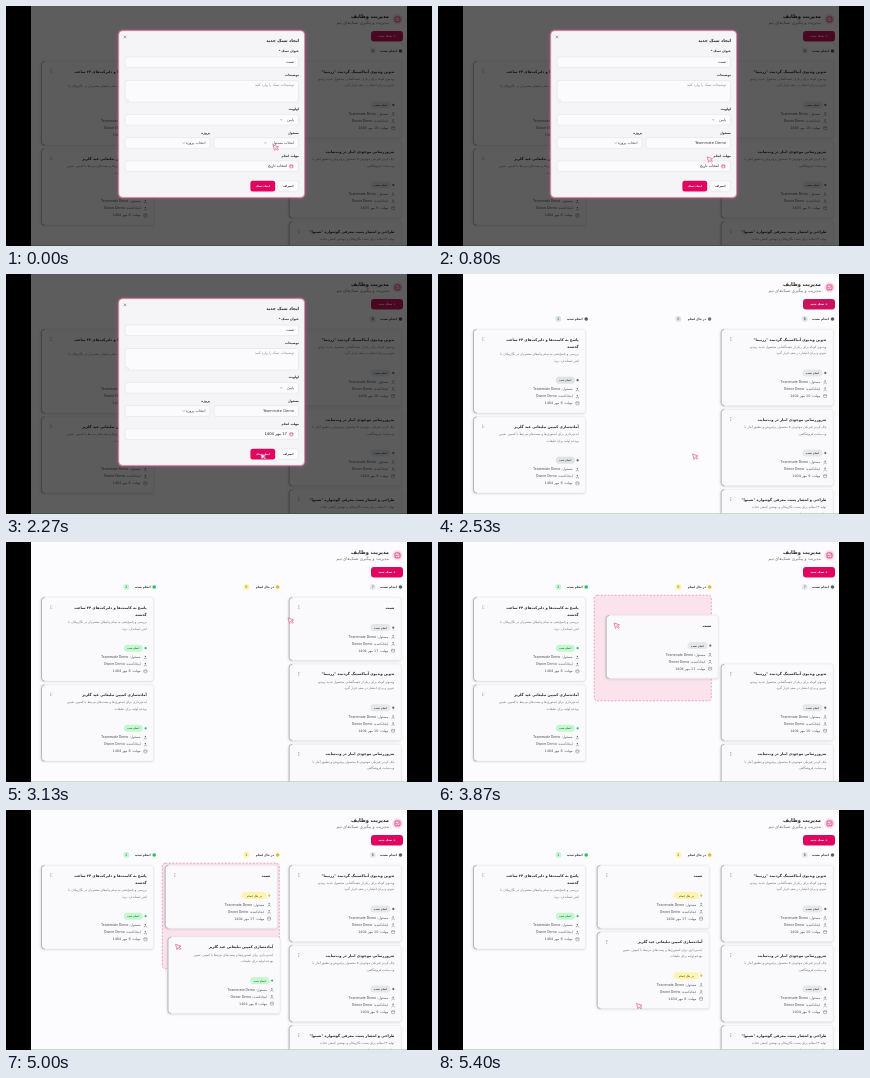
Animation, 426 px wide and 240 px high, one loop 5470 ms. Source, as an HTML page:

```html
<!DOCTYPE html>
<html lang="fa">
<head>
<meta charset="utf-8">
<title>مدیریت وظایف</title>
<style>
html, body { margin: 0; width: 100%; height: 100%; overflow: hidden; background: #000; }
svg { display: block; width: 100vw; height: 100vh; }
text { direction: rtl; font-family: "DejaVu Sans", sans-serif; white-space: pre; }
.latin { font-family: Roboto, sans-serif; }
</style>
</head>
<body>
<svg id="stage" viewBox="0 0 426 240"></svg>
<script>
const LOOP = 5470;
const PINK = '#e0065f', INK = '#222127', SOFT = '#6f6d75';
const STAFF = 'Teammate Demo', OWNER = 'Owner Demo';
const COL = { todo: 283, doing: 159, done: 35.3 };
const TOP = 55.3, GAP = 3.7;

// Key times of the story
const MENU = 220, PICK = 680, CAL = 1150, DAY = 1740, CLOSE = 2470, COLOUR = 2700,
  ADD = 2800, GRAB1 = 3400, DROP1 = 4060, GRAB2 = 4680, DROP2 = 5080;

// Even out the width of the installed Arabic face
const pen = document.createElement('canvas').getContext('2d');
function fit(weight, str, em) {
  pen.font = weight + ' 100px "DejaVu Sans", sans-serif';
  return em * 100 / pen.measureText(str).width;
}
const SCALE = {
  700: fit(700, 'مدیریت وظایف', 38 / 7),
  400: fit(400, 'توضیحات تسک را وارد کنید', 39 / 3.5)
};

const rect = (x, y, w, h, r, fill, more = '') =>
  `<rect x="${x}" y="${y}" width="${w}" height="${h}" rx="${r}" fill="${fill}" ${more}/>`;
const dot = (x, y, r, fill, more = '') => `<circle cx="${x}" cy="${y}" r="${r}" fill="${fill}" ${more}/>`;
const line = (d, colour, w = 0.5) =>
  `<path d="${d}" fill="none" stroke="${colour}" stroke-width="${w}" stroke-linecap="round" stroke-linejoin="round"/>`;
// An underscore in a string stands for a zero-width non-joiner
const text = (x, y, size, str, { w = 400, c = INK, a = 'start', id = '' } = {}) =>
  `<text ${id && `id="${id}"`} x="${x}" y="${y + size * 0.3}" font-size="${size * SCALE[w]}" font-weight="${w}" fill="${c}" text-anchor="${a}">${str.replace(/_/g, '&zwnj;')}</text>`;
const latin = (str, size = 3.6) => `<tspan class="latin" font-size="${size}">${str}</tspan>`;
const group = (id, body) => `<g id="${id}">${body}</g>`;
const calendarIcon = (x, y, c) =>
  rect(x - 1.5, y - 1.4, 3, 3, 0.5, 'none', `stroke="${c}" stroke-width=".45"`) + line(`M${x - 1.5} ${y - 0.4}h3`, c, 0.4);

const STATUS = {
  todo: { label: 'انجام نشده', w: 20, bg: '#e5e7eb', ink: '#33363d', dot: '#5b6069' },
  doing: { label: 'در حال انجام', w: 24.5, bg: '#fdf5ad', ink: '#6b5a12', dot: '#e3bd1c' },
  done: { label: 'انجام شده', w: 19, bg: '#c5f7d1', ink: '#17793a', dot: '#27c25a' },
  grey: { label: 'انجام شده', w: 19, bg: '#dfe3e2', ink: '#3b4340', dot: '#565b5a' },
  hover: { label: 'انجام شده', w: 19, bg: '#e0508c', ink: '#fff', dot: '#27c25a' }
};

const CARDS = {
  unbox: { title: ['تدوین ویدیوی آنباکسینگ گردنبند "زرنیما"'], due: '10',
    note: ['ویدیوی کوتاه برای ریلز از جعبه_گشایی محصول جدید. ویدیو', 'تدوین و برای انتشار در صف قرار گیرد.'] },
  stock: { title: ['به_روزرسانی موجودی انبار در وب_سایت'], due: '9',
    note: ['چک کردن فیزیکی موجودی ۵ محصول پرفروش و تطبیق آمار با', 'وب_سایت فروشگاهی.'] },
  post: { title: ['طراحی و انتشار پست معرفی گوشواره "شبنوا"'], due: '9',
    note: ['تولید ۳ اسلاید برای پست نگارپیکان و نوشتن کپشن جذاب', 'برای معرفی محصول.'] },
  reply: { title: ['پاسخ به کامنت_ها و دایرکت_های ۲۴ ساعت', 'گذشته'], due: '8',
    note: ['بررسی و پاسخ_دهی به تمام پیام_های مشتریان در نگارپیکان با', 'لحن استاندارد برند.'] },
  test: { title: ['تست'], due: '17', note: [] },
  promo: { title: ['آماده_سازی کمپین تبلیغاتی عید گلریز'], due: '8',
    note: ['ایده_پردازی برای استوری_ها و پست_های مرتبط با کمپین. تعیین', 'بودجه اولیه برای تبلیغات.'] }
};

function tag(name, key, y) {
  const s = STATUS[key];
  return group(`${name}-${key}`,
    rect(101.5 - s.w, y - 3.5, s.w, 7, 3.5, s.bg) +
    text(101.5 - s.w / 2, y, 3.3, s.label, { w: 700, c: s.ink, a: 'middle' }) +
    dot(104.3, y, 1.1, s.dot));
}

function card(name) {
  const { title, note, due } = CARDS[name];
  const drop = (title.length - 1) * 7.3;
  const y = (note.length ? 43.6 : 30.3) + drop;
  const h = y + 32.8;
  CARDS[name].h = h;
  const meta = [`مسئول: ${latin(STAFF)}`, `ایجادکننده: ${latin(OWNER)}`, `مهلت: ${due} مهر 1404`];
  let s = rect(-0.7, 0.5, 113, h + 0.5, 3, '#8d8790', 'opacity=".28" filter="url(#soft)"') +
    rect(0, 0, 112.3, h, 3, '#faf9fb', 'stroke="#e6e3e8" stroke-width=".4"') +
    line(`M3 0.2Q0.2 0.2 0.2 3V${h - 3}Q0.2 ${h} 3 ${h}`, '#a39ba3', 0.7);
  for (const d of [-1.4, 0, 1.4]) s += dot(9.5, 9.7 + d, 0.45, '#77747c') + dot(10.7, 9.7 + d, 0.3, '#a9a6ad');
  title.forEach((str, i) => s += text(105.4, 9.8 + i * 7.3, 5, str, { w: 700 }));
  note.forEach((str, i) => s += text(105.4, 17.8 + drop + i * 6.4, 3.2, str, { c: SOFT }));
  for (const key in STATUS) s += tag(name, key, y);
  meta.forEach((str, i) => {
    const my = y + 9 + i * 7;
    s += text(99.3, my, 3.4, str, { c: '#56545c' });
    s += i < 2 ? dot(104.1, my - 0.8, 0.75, '#77747c') + line(`M102.8 ${my + 1.5}q1.3 -2 2.6 0`, '#77747c', 0.6)
      : calendarIcon(104.1, my, '#77747c');
  });
  return group(name, s);
}

function heading(key, right) {
  const s = STATUS[key], w = key === 'doing' ? 30.5 : 27;
  return dot(right, 45, 1.8, s.dot, `id="dot-${key}"`) +
    text(right - 3.7, 45, key === 'doing' ? 4 : 4.2, s.label, { w: 700 }) +
    dot(right - w - 0.8, 45, 3, s.bg, `id="pill-${key}"`) +
    text(right - w - 0.8, 45, 3.4, '', { c: s.ink, a: 'middle', id: `count-${key}` });
}

function board() {
  return rect(25, 0, 376, 240, 0, '#fcfbfd') +
    dot(391.5, 13.2, 5.2, '#fbdce7') +
    rect(389, 10.9, 5, 5, 1, 'none', `stroke="${PINK}" stroke-width=".7"`) +
    line('M390.3 13.4l.9 .9l1.6 -1.8', PINK, 0.6) +
    text(383, 10, 7, 'مدیریت وظایف', { w: 700 }) +
    text(383, 17.2, 4.2, 'مدیریت و پیگیری تسک_های تیم', { c: SOFT }) +
    rect(365, 25, 32, 10.6, 3, PINK, 'id="add"') +
    text(381, 30.2, 3.9, '+ تسک جدید', { w: 700, c: '#fff', a: 'middle' }) +
    heading('todo', 394.5) + heading('doing', 271.6) + heading('done', 148.2) +
    rect(156.3, 53.2, 117, 105.6, 3, '#fbe3ec', 'id="zone" stroke="#ea86ae" stroke-width=".7" stroke-dasharray="2 1.5"') +
    Object.keys(CARDS).map(card).join('') +
    rect(25, 239.2, 376, 0.8, 0, '#b9d6b6');
}

const field = (x, y, w, h) => rect(x, y, w, h, 2, '#fbfafc', 'stroke="#e0dde3" stroke-width=".5"');
const label = (x, y, str) => text(x, y, 4.3, str, { w: 700 });
const select = (x, y, w, str, id, chevron) => field(x, y, w, 10.8) +
  text(x + w - 4.5, y + 5.4, 3.7, str, { c: '#44424a', id }) +
  line(`M${chevron} ${y + 5}l1 .9l1 -.9`, '#77747c', 0.45);

function calendar() {
  const xAt = i => 283.3 - i * 11.7;
  let s = rect(204.3, 53, 88.4, 101.3, 2.5, '#fbfafc', 'stroke="#d98daa" stroke-width=".7"') +
    text(248.3, 60, 4.7, 'مهر 1404', { w: 700, a: 'middle' }) +
    line('M283.6 58.8l1.2 1.3l-1.2 1.3M212.6 58.8l-1.2 1.3l1.2 1.3', '#44424a', 0.55) +
    dot(xAt(5), 98.2, 5.4, '#f8c9db') + dot(xAt(5), 110.2, 5.4, '#f9dbe6', 'id="pick"');
  [...'شیدسچپج'].forEach((ch, i) => s += text(xAt(i), 74, 3.3, ch, { c: '#8c8991', a: 'middle' }));
  for (let n = 0; n < 42; n++) {
    const day = n - 2, inside = day > 0 && day < 31;
    const num = day < 1 ? day + 31 : inside ? day : day - 30;
    const c = !inside ? '#c9c6cd' : day === 10 ? PINK : '#34323a';
    s += `<text class="latin" x="${xAt(n % 7)}" y="${87.6 + Math.floor(n / 7) * 11.75}" font-size="4" fill="${c}" text-anchor="middle">${num}</text>`;
  }
  return group('cal', s);
}

function modal() {
  const menu = rect(208, 144, 84.6, 21, 2, '#fff', 'stroke="#d98daa" stroke-width=".6"') +
    rect(209, 145, 82.6, 9.3, 1.5, '#f8d6e2', 'id="option"') +
    [STAFF, OWNER].map((str, i) => text(288, 149.7 + i * 9.7, 3.6, latin(str, 3.8))).join('');
  return rect(25, 0, 376, 240, 0, '#000', 'opacity=".63"') +
    rect(111.6, 23.8, 188, 168.8, 5, '#e0548c', 'opacity=".55" filter="url(#soft)"') +
    rect(112.7, 24.7, 185.8, 166.7, 4, '#f5f4f6', 'stroke="#dc86a8" stroke-width=".7"') +
    line('M118 29.9l2 2m0 -2l-2 2', '#55535b', 0.5) +
    text(293, 34.2, 5.9, 'ایجاد تسک جدید', { w: 700 }) +
    label(293, 45, 'عنوان تسک *') + field(119, 51, 173.6, 10.6) + text(288, 56.2, 3.7, 'تست') +
    label(293, 69, 'توضیحات') + field(119, 74.5, 173.6, 21.6) +
    text(288, 79.4, 3.5, 'توضیحات تسک را وارد کنید', { c: '#8c8991' }) +
    line('M120.5 93.4l2.2 1.6', '#a9a6ad', 0.35) +
    label(293, 103, 'اولویت') + select(119, 108.4, 173.6, 'پایین', '', 274.3) +
    label(293, 126.4, 'مسئول') + select(208, 131.6, 84.6, 'انتخاب مسئول', 'who', 258.5) +
    label(204, 126.4, 'پروژه') + select(119, 131.6, 85, 'انتخاب پروژه', '', 176.8) +
    label(293, 149.8, 'مهلت انجام') + field(119, 154.8, 173.6, 10.8) + calendarIcon(285.3, 160.2, PINK) +
    text(281, 160.2, 3.8, 'انتخاب تاریخ', { id: 'due' }) +
    rect(272, 174.8, 20.6, 10.6, 2.5, '#fbfafc', 'stroke="#e0dde3" stroke-width=".5"') +
    text(282.3, 180, 3.8, 'انصراف', { w: 700, a: 'middle' }) +
    rect(244.4, 174.8, 24.8, 10.6, 2.5, PINK) +
    text(256.8, 180, 3.7, 'ایجاد تسک', { w: 700, c: '#fff', a: 'middle' }) +
    group('menu', menu) + calendar();
}

document.getElementById('stage').innerHTML =
  `<defs><filter id="soft" x="-10%" y="-10%" width="120%" height="120%"><feGaussianBlur stdDeviation="1"/></filter>
  <filter id="haze"><feGaussianBlur stdDeviation=".55"/></filter></defs>` +
  group('board', board()) + group('modal', modal()) +
  group('cursor', '<path d="M0 0L1.5 5.4L2.7 3.5L4.6 5.3L5.4 4.5L3.6 2.8L5.5 1.8Z" fill="#fdeaf1" stroke="#df5c8c" stroke-width=".65" stroke-linejoin="round"/>') +
  rect(0, 0, 25, 240, 0, '#000') + rect(401, 0, 25, 240, 0, '#000');

const el = {};
document.querySelectorAll('[id]').forEach(n => el[n.id] = n);
const show = (id, on) => el[id].style.display = on ? '' : 'none';
const put = (id, value) => { if (el[id].textContent !== value) el[id].textContent = value; };
const move = (id, x, y) => el[id].setAttribute('transform', `translate(${x} ${y})`);

// time, x, y of the pointer tip
const PATH = [
  [0, 267, 139], [240, 267, 139], [540, 272, 148], [PICK, 272, 148], [1020, 262, 158],
  [CAL, 262, 158], [1480, 223, 108], [DAY, 223, 108], [2250, 254.5, 180], [2560, 254.5, 180],
  [3130, 282, 76], [3300, 291, 63], [GRAB1, 291, 63], [3850, 176, 81], [DROP1, 176, 81],
  [4400, 122, 185], [4600, 43, 150], [GRAB2, 43, 150], [5030, 172, 134], [DROP2, 172, 134],
  [5380, 198.5, 193.5], [LOOP, 198.5, 193.5]
];
function pointer(t) {
  const i = Math.max(1, PATH.findIndex(k => k[0] > t));
  const [t0, x0, y0] = PATH[i - 1], [t1, x1, y1] = PATH[i];
  const u = (t - t0) / (t1 - t0), e = u * u * (3 - 2 * u);
  return [x0 + (x1 - x0) * e, y0 + (y1 - y0) * e];
}

function render(t) {
  const [px, py] = pointer(t);
  const open = t < CLOSE, grey = t < COLOUR;
  const drag1 = t >= GRAB1 && t < DROP1, drag2 = t >= GRAB2 && t < DROP2;
  move('cursor', px, py);

  show('modal', open);
  if (open) el.board.setAttribute('filter', 'url(#haze)');
  else el.board.removeAttribute('filter');
  show('menu', t >= MENU && t < PICK);
  show('option', t > 400);
  show('cal', t >= CAL && t < DAY + 60);
  show('pick', t > 1400);
  put('who', t < PICK ? 'انتخاب مسئول' : STAFF);
  put('due', t < DAY ? 'انتخاب تاریخ' : '17 مهر 1404');

  const columns = {
    todo: [...(t >= ADD && t < DROP1 ? ['test'] : []), 'unbox', 'stock', 'post'],
    doing: [...(t >= DROP1 ? ['test'] : []), ...(t >= DROP2 ? ['promo'] : [])],
    done: ['reply', ...(t < DROP2 ? ['promo'] : [])]
  };
  show('test', t >= ADD);
  for (const key in columns) {
    let y = TOP;
    for (const name of columns[key]) {
      const held = name === 'test' && drag1 ? [291, 63] : name === 'promo' && drag2 ? [43, 150] : null;
      move(name, COL[key] + (held ? px - held[0] : 0), y + (held ? py - held[1] : 0));
      const over = name === 'promo' && key === 'done' && t > DROP1 && !held &&
        px > 114 && px < 137 && py > 182 && py < 191;
      const state = over ? 'hover' : key === 'done' && grey ? 'grey' : key;
      for (const s in STATUS) show(`${name}-${s}`, s === state);
      y += CARDS[name].h + GAP;
    }
    put(`count-${key}`, String(columns[key].length + (key === 'todo' ? 3 : 0)));
    const tint = STATUS[grey ? 'grey' : key];
    el[`dot-${key}`].setAttribute('fill', key === 'doing' && grey ? '#77706a' : tint.dot);
    el[`pill-${key}`].setAttribute('fill', tint.bg);
  }
  show('zone', (drag1 && px < 235) || (drag2 && px > 120));
  el.add.setAttribute('fill', grey ? '#c9145d' : PINK);
}

const start = performance.now();
function tick() {
  render((performance.now() - start) % LOOP);
  requestAnimationFrame(tick);
}
tick();
</script>
</body>
</html>
```
